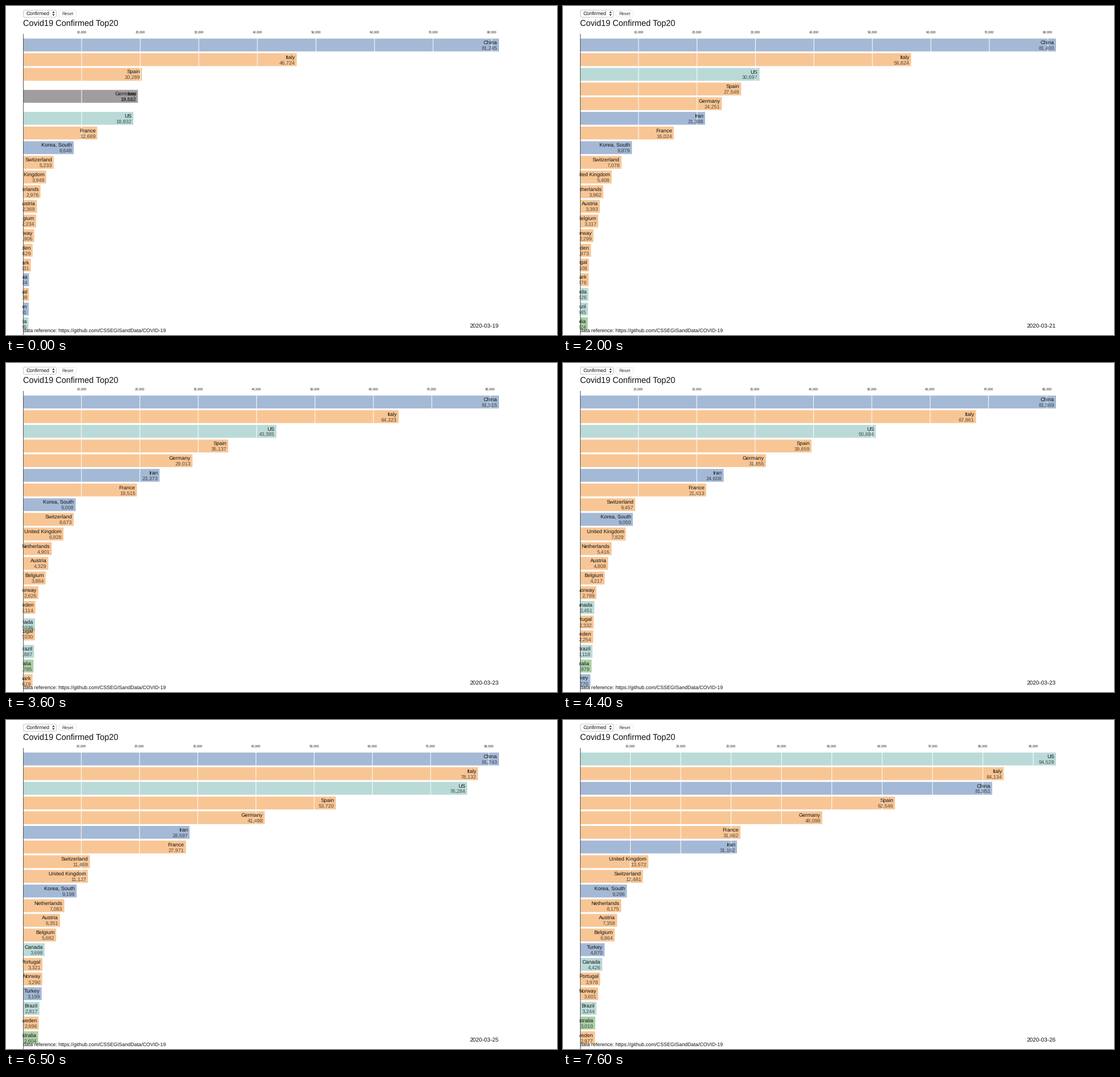
Animation, 969 px wide and 578 px high, one loop 7.7 s. Source, as a matplotlib script:

```python
import numpy as np
import matplotlib.pyplot as plt
from matplotlib.animation import FuncAnimation
from matplotlib.patches import FancyBboxPatch, Polygon, Rectangle

W, H, DPI = 969, 578, 64
FRAMES, STEP_MS = 77, 100
LEFT, RIGHT = 30, 867
TOP, PITCH, BAR_H = 57.2, 25.77, 22.6
TOP_N = 20
PX = 72 / DPI
INK = "#111111"

plt.rcParams["font.family"] = "Liberation Sans"
plt.rcParams["text.hinting"] = "none"

# Key points: playback seconds, day of March, and each country's count there.
# Counts grow geometrically from one key point to the next.
KEY_S = [0, 2.7, 5.4, 7.6]
KEY_DAY = np.array([19.9502, 22.2975, 24.6491, 26.5999])
EUROPE = {
    "Italy": (46723, 60563, 72558, 84134),
    "Spain": (20288, 30662, 46137, 62546),
    "Germany": (19622, 26117, 35802, 48098),
    "France": (12669, 17397, 24555, 31862),
    "Switzerland": (5233, 7867, 10539, 12481),
    "United Kingdom": (3949, 6037, 9122, 13572),
    "Netherlands": (2976, 4380, 6137, 8175),
    "Austria": (2369, 3847, 5481, 7358),
    "Belgium": (2234, 3503, 4703, 6864),
    "Norway": (1906, 2455, 3006, 3601),
    "Sweden": (1629, 1967, 2442, 2977),
    "Denmark": (1331, 1531, 1811, 2129),
    "Portugal": (1008, 1737, 2773, 3978),
}
AMERICAS = {
    "US": (18830, 36421, 61555, 94529),
    "Canada": (936, 1653, 3089, 4426),
    "Brazil": (740, 1658, 2446, 3244),
}
OCEANIA = {"Australia": (786, 1589, 2252, 3010)}
ASIA = {
    "China": (81245, 81454, 81636, 81851),
    "Iran": (19582, 22058, 26243, 31162),
    "Korea, South": (8648, 8961, 9102, 9296),
    "Malaysia": (1024, 1369, 1736, 2110),
    "Japan": (961, 1106, 1267, 1425),
    "Turkey": (350, 1323, 2100, 4870),
}
REGIONS = [(EUROPE, "#f28e2c"), (AMERICAS, "#76b7b2"),
           (OCEANIA, "#59a14f"), (ASIA, "#4a75ac")]

# The race re-ranks ten times a day.
FIRST, LAST = 199, 267
days = np.arange(FIRST, LAST + 1) / 10
logs = np.log([c for group, _ in REGIONS for c in group.values()])
rate = np.diff(logs) / np.diff(KEY_DAY)
seg = np.clip(np.searchsorted(KEY_DAY, days) - 1, 0, len(KEY_DAY) - 2)
values = np.exp(logs[:, seg] + rate[:, seg] * (days - KEY_DAY[seg]))
leader = values.max(axis=0)
shares = values / leader
ranks = np.minimum(np.argsort(np.argsort(-values, axis=0), axis=0), TOP_N)

fig = plt.figure(figsize=(W / DPI, H / DPI), dpi=DPI, facecolor="white")
ax = fig.add_axes([0, 0, 1, 1])
ax.set_xlim(0, W)
ax.set_ylim(H, 0)
ax.axis("off")


def text(x, y, s, size, color=INK, **kw):
    return ax.text(x, y, s, fontsize=size * PX, va="baseline", color=color, **kw)


def button(x, y, w, h, edge):
    ax.add_patch(FancyBboxPatch((x, y), w, h, boxstyle="round,pad=0,rounding_size=2.5",
                                fc="white", ec=edge, lw=0.8 * PX))


def triangle(y, tip):
    ax.add_patch(Polygon([(81.3, y), (85.7, y), (83.5, tip)], fc="#333333", ec="none"))


# Controls, title and footer
button(30.4, 7.2, 58, 12.6, "#b9b9b9")
text(36, 16.4, "Confirmed", 8.9)
triangle(12.3, 9.2)
triangle(14.4, 17.5)
button(93, 7.7, 30.8, 11.4, "#e4e4e4")
text(98, 16.2, "Reset", 7.8, "#333333")
text(29.6, 35, "Covid19 Confirmed Top20", 14.5)
text(29.6, 573.3, "data reference: https://github.com/CSSEGISandData/COVID-19", 8.9, zorder=6)
date = text(RIGHT, 566, "", 10, ha="right", zorder=6)
ax.plot([30.3, 30.3], [49, H], color="#444444", lw=0.9 * PX, zorder=3)

# Labels are cut off at the chart's left edge.
chart_clip = Rectangle((29.5, 0), W, H, transform=ax.transData)


def bar_label(s, size, **kw):
    label = text(0, 0, s, size, ha="right", zorder=5, clip_on=True, **kw)
    label.set_clip_path(chart_clip)
    return label


rows = []
for group, color in REGIONS:
    for country in group:
        bar = ax.add_patch(Rectangle((LEFT, 0), 0, BAR_H, fc=color, ec="none",
                                     alpha=0.5, zorder=1, snap=False))
        rows.append((bar, bar_label(country, 9.3),
                     bar_label("", 9, color="black", alpha=0.65)))

ticks = []
for t in range(10000, 100000, 10000):
    line, = ax.plot([0, 0], [TOP - 1, H], color="white", lw=PX, zorder=2, snap=False)
    ticks.append((t, line, text(0, 47, f"{t:,}", 5.6, "#222222", ha="center")))


def draw(n):
    day = np.interp(n * STEP_MS / 1000, KEY_S, KEY_DAY)
    a, f = divmod(day * 10 - FIRST, 1)
    a = int(a)

    def tween(series):
        return series[a] + (series[a + 1] - series[a]) * f

    for (bar, name, count), value, share, rank in zip(rows, values, shares, ranks):
        shown = min(rank[a], rank[a + 1]) < TOP_N
        for part in (bar, name, count):
            part.set_visible(shown)
        y = TOP + PITCH * tween(rank)
        width = (RIGHT - LEFT) * tween(share)
        bar.set_y(y)
        bar.set_width(width)
        name.set_position((LEFT + width - 3, y + 9.7))
        count.set_position((LEFT + width - 3, y + 19.6))
        count.set_text(f"{tween(value):,.0f}")

    for t, line, label in ticks:
        x = LEFT + (RIGHT - LEFT) * tween(t / leader)
        line.set_xdata([x, x])
        label.set_x(x)
        for part in (line, label):
            part.set_alpha(tween((t <= leader).astype(float)))

    date.set_text(f"2020-03-{(FIRST + a) // 10}")
    return []


anim = FuncAnimation(fig, draw, frames=FRAMES, interval=STEP_MS,
                     init_func=lambda: [], repeat=True, repeat_delay=0)
plt.show()
```
